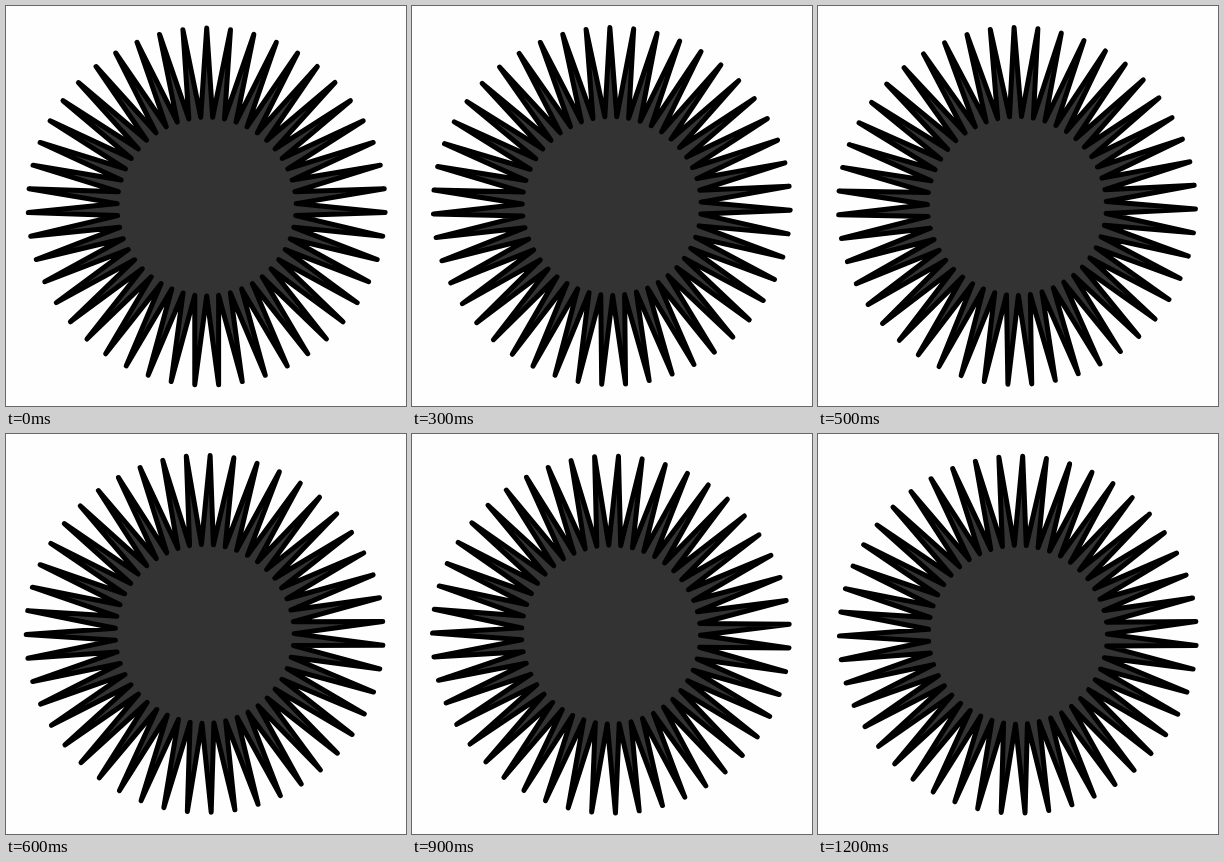
Animation of 400 by 400 pixels, one loop 1.3 s. Source, as an HTML page with a canvas:

```html
<!DOCTYPE html>
<html lang="en">
<head>
<meta charset="utf-8">
<title>Spinning spiked disc</title>
<style>
html, body { margin: 0; width: 100%; height: 100%; overflow: hidden; background: #fefefe; }
canvas { display: block; width: 400px; height: 400px; }
</style>
</head>
<body>
<canvas id="stage"></canvas>
<script>
const STEP = 100, STEPS = 13, SPIKES = 47;
const OUTER = 178.5, INNER = 89.5;

// Uneven hand-turned spin: step, angle in degrees, centre x, centre y
const poses = [
  [0, 0, 200.7, 200.6],
  [2, 56, 200.3, 200],
  [4, 111.3, 199.2, 200.1],
  [6, 162.6, 198.7, 199.9],
  [7, 190.4, 199.3, 201],
  [9, 247.5, 199, 200.6],
  [12, 330.9, 199.9, 200.7],
  [13, 360, 200.7, 200.6]
];

const canvas = document.getElementById("stage");
const ctx = canvas.getContext("2d");
const ratio = window.devicePixelRatio || 1;
canvas.width = canvas.height = 400 * ratio;

function makeStar() {
  const path = new Path2D();
  for (let i = 0; i < SPIKES * 2; i++) {
    const a = i * Math.PI / SPIKES;
    const r = i % 2 ? INNER : OUTER;
    path.lineTo(r * Math.sin(a), -r * Math.cos(a));
  }
  path.closePath();
  return path;
}

function poseAt(step) {
  const i = poses.findIndex(p => p[0] > step);
  const from = poses[i - 1], to = poses[i];
  const k = (step - from[0]) / (to[0] - from[0]);
  return from.map((v, j) => v + (to[j] - v) * k);
}

const star = makeStar();

function draw(now) {
  const step = Math.floor(now / STEP) % STEPS;
  const [, angle, x, y] = poseAt(step);
  ctx.setTransform(ratio, 0, 0, ratio, 0, 0);
  ctx.fillStyle = "#fefefe";
  ctx.fillRect(0, 0, 400, 400);
  ctx.translate(x, y);
  ctx.rotate(angle * Math.PI / 180);
  ctx.fillStyle = "#333";
  ctx.fill(star);
  ctx.strokeStyle = "#000";
  ctx.lineWidth = 5;
  ctx.lineJoin = "round";
  ctx.stroke(star);
}

const start = performance.now();
function tick() {
  draw(performance.now() - start);
  requestAnimationFrame(tick);
}
tick();
</script>
</body>
</html>
```
